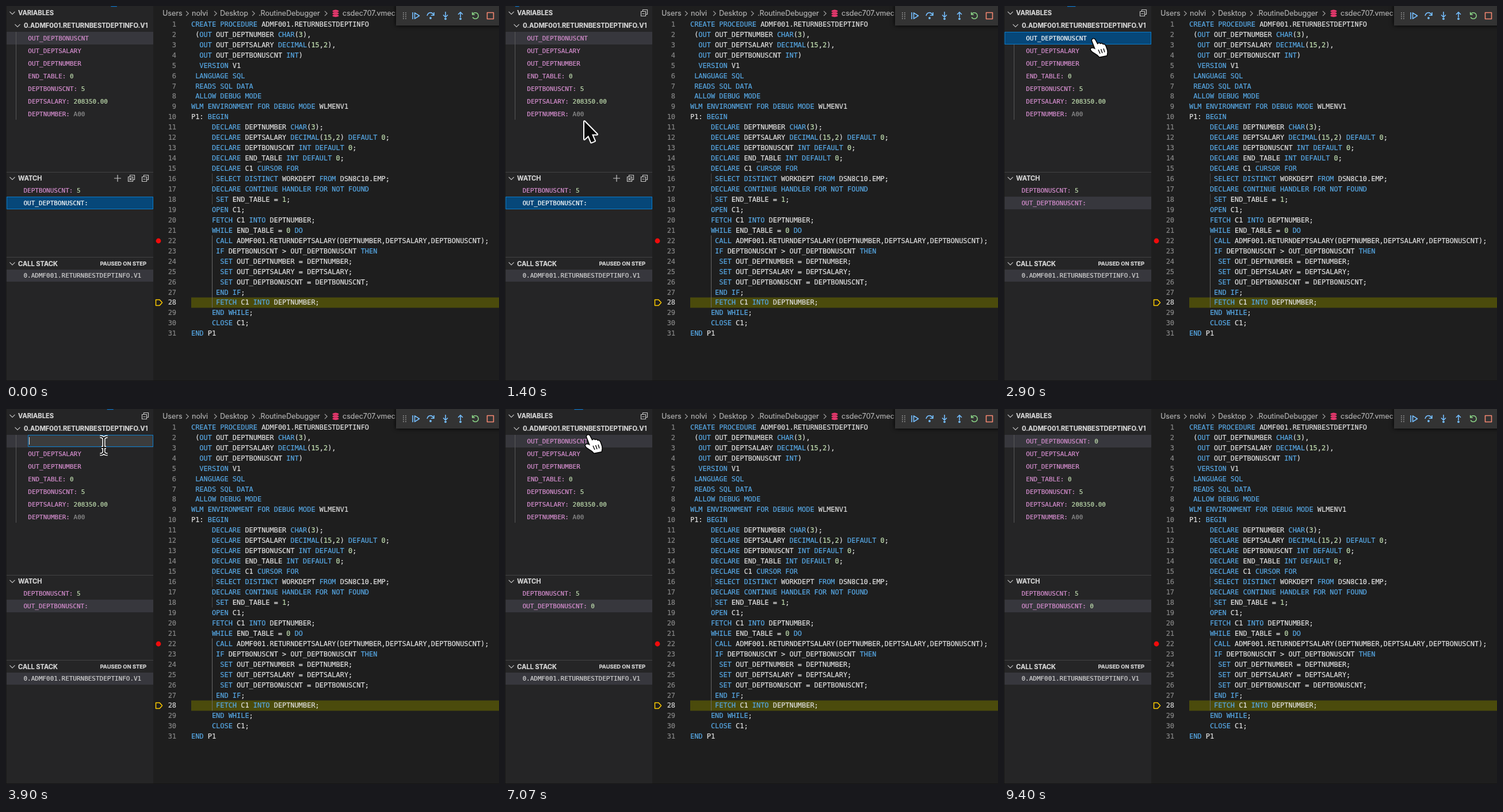
These frames come from a looping animation (857x653 px, 9500 ms). An HTML page with a canvas:

```html
<!DOCTYPE html>
<html lang="en">
<head>
<meta charset="utf-8">
<title>Debugger session</title>
<style>
html, body { margin: 0; width: 100%; height: 100%; overflow: hidden; background: #1e1e1e; }
canvas { display: block; }
</style>
</head>
<body>
<canvas id="stage" width="857" height="653"></canvas>
<script>
const ctx = document.getElementById('stage').getContext('2d');
const LOOP = 9500;
const CODE_FONT = '11.95px "DejaVu Sans Mono", monospace';
const ROW_FONT = '10.97px "DejaVu Sans Mono", monospace';
const CRUMB_FONT = '12.5px Inter, sans-serif';
const bold = size => `bold ${size}px Inter, sans-serif`;

const BLUE = '#56a6e2', TEXT = '#dedede', NUMBER = '#bfdcae', PINK = '#d78fd0';
const TITLE = '#d4d4d4', ROW_GREY = '#37373d', FOCUS = '#0b7ccb', STEP = '#75beff';

const source = `CREATE PROCEDURE ADMF001.RETURNBESTDEPTINFO
 (OUT OUT_DEPTNUMBER CHAR(3),
  OUT OUT_DEPTSALARY DECIMAL(15,2),
  OUT OUT_DEPTBONUSCNT INT)
  VERSION V1
 LANGUAGE SQL
 READS SQL DATA
 ALLOW DEBUG MODE
WLM ENVIRONMENT FOR DEBUG MODE WLMENV1
P1: BEGIN
     DECLARE DEPTNUMBER CHAR(3);
     DECLARE DEPTSALARY DECIMAL(15,2) DEFAULT 0;
     DECLARE DEPTBONUSCNT INT DEFAULT 0;
     DECLARE END_TABLE INT DEFAULT 0;
     DECLARE C1 CURSOR FOR
      SELECT DISTINCT WORKDEPT FROM DSN8C10.EMP;
     DECLARE CONTINUE HANDLER FOR NOT FOUND
      SET END_TABLE = 1;
     OPEN C1;
     FETCH C1 INTO DEPTNUMBER;
     WHILE END_TABLE = 0 DO
      CALL ADMF001.RETURNDEPTSALARY(DEPTNUMBER,DEPTSALARY,DEPTBONUSCNT);
      IF DEPTBONUSCNT > OUT_DEPTBONUSCNT THEN
       SET OUT_DEPTNUMBER = DEPTNUMBER;
       SET OUT_DEPTSALARY = DEPTSALARY;
       SET OUT_DEPTBONUSCNT = DEPTBONUSCNT;
      END IF;
      FETCH C1 INTO DEPTNUMBER;
     END WHILE;
     CLOSE C1;
END P1`.split('\n');
const keywords = new Set(('CREATE PROCEDURE OUT CHAR DECIMAL INT VERSION LANGUAGE SQL READS DATA ALLOW ' +
  'DEBUG MODE WLM ENVIRONMENT FOR BEGIN DECLARE DEFAULT CURSOR SELECT DISTINCT FROM CONTINUE HANDLER ' +
  'NOT FOUND SET OPEN FETCH INTO WHILE DO CALL IF THEN END CLOSE').split(' '));

// The hairline stroke gives the slightly heavier strokes of smoothed text.
function text(str, x, y, color, font, align = 'left') {
  ctx.font = font;
  ctx.fillStyle = ctx.strokeStyle = color;
  ctx.lineWidth = .2;
  ctx.textAlign = align;
  ctx.fillText(str, x, y);
  ctx.strokeText(str, x, y);
  return ctx.measureText(str).width;
}

function rect(x, y, w, h, color) {
  ctx.fillStyle = color;
  ctx.fillRect(x, y, w, h);
}

function frame(x, y, w, h, color) {
  ctx.strokeStyle = color;
  ctx.lineWidth = 1;
  ctx.strokeRect(x + .5, y + .5, w - 1, h - 1);
}

// Path data is relative to (x, y).
function shape(d, x, y, { fill, stroke, width = 1.2 }) {
  ctx.save();
  ctx.translate(x, y);
  ctx.lineJoin = 'round';
  const path = new Path2D(d);
  if (stroke) {
    ctx.strokeStyle = stroke;
    ctx.lineWidth = width;
    ctx.stroke(path);
  }
  if (fill) {
    ctx.fillStyle = fill;
    ctx.fill(path);
  }
  ctx.restore();
}

function dot(x, y, r, color) {
  ctx.fillStyle = color;
  ctx.beginPath();
  ctx.arc(x, y, r, 0, 7);
  ctx.fill();
}

const chevronDown = (x, y) => shape('M-4.5-2.2 0 2.3 4.5-2.2', x, y, { stroke: '#c5c5c5' });

function stackedIcon(x, y, mark) {
  shape('M-2.5-2.5V-5.5H5.5V2.5H2.5M-5.5-2.5H2.5V5.5H-5.5Z' + mark, x, y, { stroke: '#c5c5c5' });
}
const collapseIcon = y => stackedIcon(242, y, 'M-3.5 1.5H.5');

function section(title, y) {
  chevronDown(11, y);
  text(title, 21, y + 4, TITLE, bold(11.1));
}

function row(name, value, x, y, selected, valueColor = NUMBER) {
  const label = name + (value === undefined ? '' : ': ');
  const w = text(label, x, y + 4, selected ? '#ffffff' : PINK, ROW_FONT);
  if (value) text(value, x + w, y + 4, valueColor, ROW_FONT);
}

function rowBackground(y, focused) {
  rect(1, y, 255, 22, focused ? '#064779' : ROW_GREY);
  if (focused) frame(1, y, 255, 22, FOCUS);
}

function drawEditor() {
  rect(256, 0, 601, 653, '#1e1e1e');
  rect(322, 507.5, 535, 18, '#4b4b0c');

  const guide = (from, to, color) => rect(358, 22 + (from - 1) * 17.97, 1, (to - from + 1) * 17.97, color);
  guide(16, 16, '#484848');
  guide(18, 18, '#484848');
  guide(22, 28, '#686868');

  source.forEach((line, i) => {
    const y = 35.8 + i * 17.95;
    text(i + 1, 296, y, i === 27 ? '#d0d0d0' : '#858585', CODE_FONT, 'right');
    let x = 322;
    for (const token of line.match(/\w+|\W+/g)) {
      const color = keywords.has(token) ? BLUE : /^\d+$/.test(token) ? NUMBER : TEXT;
      x += text(token, x, y, color, CODE_FONT);
    }
  });

  dot(265, 409, 4.4, '#f00b0b');
  shape('M-5-5H1.5L6 0 1.5 5H-5Z', 265.5, 516.5, { stroke: '#ffcc00', width: 1.5 });

  const crumbs = [['Users', 272], ['nolvi', 323], ['Desktop', 372], ['.RoutineDebugger', 439], ['csdec707.vmec', 585]];
  for (const [name, x] of crumbs) text(name, x, 17.3, '#b0b0b0', CRUMB_FONT);
  for (const x of [315, 364, 430, 556]) shape('M-2-4.2 2.2 0-2 4.2', x, 13, { stroke: '#a0a0a0' });
  for (const y of [9, 13, 17]) shape('M-5.3-1Q0-4 5.3-1V1Q0 3.3-5.3 1Z', 573, y, { fill: '#e5386d', stroke: '#1e1e1e', width: .6 });
}

function drawToolbar() {
  ctx.save();
  ctx.shadowColor = '#000';
  ctx.shadowBlur = 7;
  rect(678, -3, 190, 37, '#333333');
  ctx.restore();
  for (const x of [691, 695]) for (const y of [12, 15.3, 18.6, 22]) rect(x - 1, y - 1, 1.8, 1.8, '#858585');
  const icon = (d, x, stroke = STEP) => shape(d, x, 17, { stroke, width: 1.6 });
  icon('M-5.5-6V6M-2-5.2V5.2L6 0Z', 712.5);
  icon('M-6 0C-4-7 3-7 5.5-1M6-6V-.7H.7', 738);
  dot(738, 21, 1.9, STEP);
  icon('M0-7V2.3M-4-1.5 0 2.5 4-1.5', 764);
  dot(764, 22.3, 1.9, STEP);
  icon('M0 3V-6M-4-2.3 0-6.3 4-2.3', 790);
  dot(790, 22.3, 1.9, STEP);
  icon('M-4.8-2.5A5.3 5.3 0 1 1-4.8 2.5M-5.3-6.3V-2H-1', 816, '#89d185');
  icon('M-5.5-5.5H5.5V5.5H-5.5Z', 842, '#f48771');
}

function drawSidebar(t, hovered) {
  const focused = t >= 2600 && t < 3450;
  const editing = t >= 3450 && t < 4800;
  const watching = t < 2600;
  const updated = t >= 9300;

  rect(0, 0, 256, 653, '#252526');
  rect(17, 45, 1, 153, '#585858');
  if (!focused) rowBackground(45, false);
  rect(17, 45, 1, 22, '#585858');
  if (focused) rowBackground(45, true);
  section('VARIABLES', 12);
  if (hovered) collapseIcon(12);
  chevronDown(20, 34);
  text('0.ADMF001.RETURNBESTDEPTINFO.V1', 31, 38, TITLE, bold(11.2));

  const variables = [
    ['OUT_DEPTBONUSCNT', updated ? '0' : undefined], ['OUT_DEPTSALARY'], ['OUT_DEPTNUMBER'],
    ['END_TABLE', '0'], ['DEPTBONUSCNT', '5'], ['DEPTSALARY', '208350.00'], ['DEPTNUMBER', 'A00']
  ];
  variables.forEach(([name, value], i) => {
    if (i || !editing) row(name, value, 38.3, 56 + i * 21.95, !i && focused, i === 6 ? '#8f8f8f' : NUMBER);
  });
  if (editing) {
    rect(38, 45, 218, 21, '#3c3c3c');
    frame(38, 45, 218, 21, FOCUS);
    const typed = t >= 4300 ? '0' : '';
    const w = text(typed, 40, 60, '#cccccc', ROW_FONT);
    if (typed || (t - 3450) % 1000 < 500) rect(40 + w, 49, 1, 13, '#e0e0e0');
  }

  rect(0, 289, 256, 1, '#434344');
  section('WATCH', 300);
  if (watching) {
    shape('M-6 0H6M0-6V6', 194, 300, { stroke: '#c5c5c5' });
    stackedIcon(218, 300, 'M-3.5-.5 .5 3.5M.5-.5-3.5 3.5');
    collapseIcon(300);
  }
  rowBackground(332, watching);
  row('DEPTBONUSCNT', '5', 30.5, 321);
  row('OUT_DEPTBONUSCNT', t >= 6500 ? '0' : '', 30.5, 343, watching);

  rect(0, 437, 256, 1, '#434344');
  section('CALL STACK', 448.5);
  text('PAUSED ON STEP', 244, 452, TITLE, bold(9.4), 'right');
  rect(1, 459, 255, 21, ROW_GREY);
  text('0.ADMF001.RETURNBESTDEPTINFO.V1', 30.5, 473, TITLE, ROW_FONT);

  if (!updated) {
    const p = (t + 2930) % 4000 / 4000;
    const w = 5.1 * (1 + 2 * (1 - Math.abs(2 * p - 1)));
    rect(p * 256 - w / 2, 0, Math.min(w, 256 - p * 256 + w / 2), 1.3, '#0e70c0');
  }
  rect(0, 0, 1, 653, '#1a1a1a');
}

// Pointer stops: time, x, y. It eases between them.
const stops = [
  [300, 190, 660], [1250, 138, 201], [1600, 138, 201], [2400, 153, 57], [3250, 153, 57], [3650, 170, 63],
  [6400, 170, 63], [6950, 142, 45], [8050, 142, 45], [8800, 870, 150]
];

function pointerAt(t) {
  const i = stops.findIndex(s => s[0] > t);
  if (i === 0) return stops[0].slice(1);
  if (i < 0) return stops[stops.length - 1].slice(1);
  const [t0, x0, y0] = stops[i - 1], [t1, x1, y1] = stops[i];
  const p = (t - t0) / (t1 - t0), e = p * p * (3 - 2 * p);
  return [x0 + (x1 - x0) * e, y0 + (y1 - y0) * e];
}

const ARROW = 'M0 0V31L7 24.5 12 36.5 18 34 13 22.5H22Z';
const HAND = 'M0 3Q1-1.5 5 1.5L9.5 10Q12 6.5 14.5 9.5Q17 7 19 10.5Q22 9 23.5 13L26 20Q27 24 25.5 29L13 31.5Q9 27 4 24.5Q-2 21-2 18Q0 15 6 18.5Z';
const IBEAM = 'M-6.5-15Q0-15 0-10Q0-15 6.5-15M0-10V11M-6.5 16Q0 16 0 11Q0 16 6.5 16M-4 4H4';

function drawPointer(t, x, y) {
  if (t >= 4300 && t < 6400) return; // hidden while typing
  if (t >= 3450 && t < 4800) {
    shape(IBEAM, x, y, { stroke: '#ffffff', width: 5 });
    shape(IBEAM, x, y, { stroke: '#111111', width: 2 });
  } else if (x < 256 && (y > 23 && y < 198 || y > 289 && y < 354)) {
    shape(HAND, x, y, { fill: '#ffffff', stroke: '#000000', width: 3 });
    shape('M11 19 14 26M15.5 18 18 25M20 17 22 23.5', x, y, { stroke: '#111111', width: 1.5 });
  } else {
    shape(ARROW, x, y, { fill: '#0a0a0a', stroke: '#ffffff', width: 4 });
  }
}

function draw(now) {
  const t = now % LOOP;
  const [x, y] = pointerAt(t);
  drawEditor();
  drawToolbar();
  drawSidebar(t, x < 256 && y < 289);
  rect(0, 652, 857, 1, '#151515');
  drawPointer(t, x, y);
  requestAnimationFrame(() => draw(performance.now() - start));
}
const start = performance.now();
draw(0);
</script>
</body>
</html>
```
